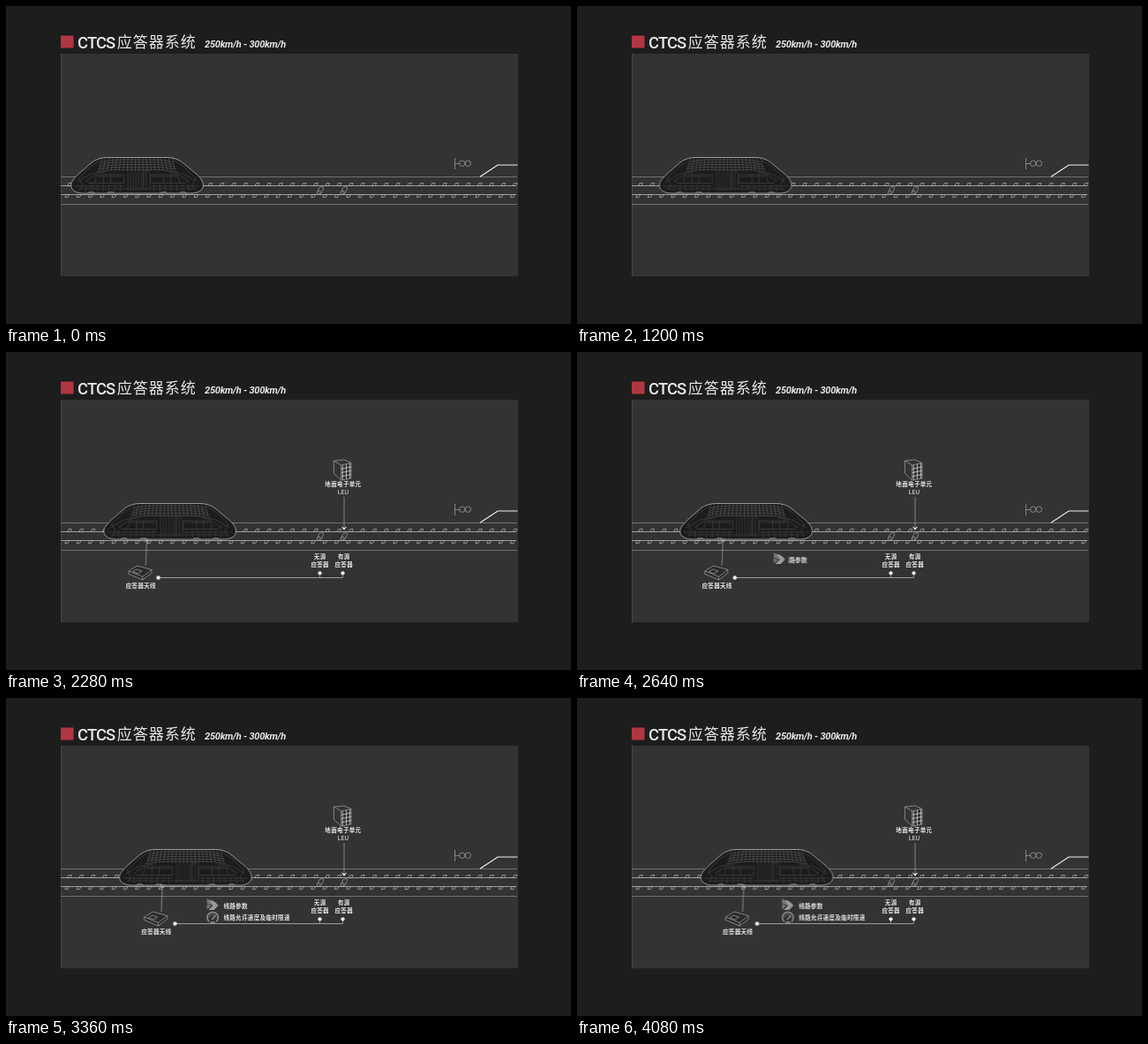
An HTML page that plays this animation: 640 by 360 pixels, repeating every 4200 ms.

```html
<!DOCTYPE html>
<html lang="zh-CN">
<head>
<meta charset="utf-8">
<title>CTCS应答器系统</title>
<style>
html, body { margin: 0; width: 100%; height: 100%; overflow: hidden; background: #1d1d1d; }
svg { display: block; width: 640px; height: 360px; }
text { font-family: "Noto Sans CJK SC", "Noto Sans CJK", sans-serif; fill: #e8e8e8; }
.label { font-size: 6.5px; font-weight: 700; letter-spacing: .35px; }
.mid { text-anchor: middle; }
.latin { font-family: Roboto, sans-serif; }
.thin { fill: none; stroke: #a8a8a8; stroke-width: .7; }
.solid { fill: #f4f4f4; }
.anim { animation: 4200ms linear -10ms infinite; }

.ride { animation-name: ride; animation-timing-function: steps(35); }
.plug { animation-name: plug; animation-timing-function: steps(35); }
.drift { animation-name: drift; animation-timing-function: steps(35); }
.shrink { animation-name: shrink; animation-timing-function: steps(35); transform-origin: 381.5px 255.5px; }
.leader { animation-name: leader; transform-origin: 122px 211px; }
.antenna { animation-name: antenna; }
.dot { animation-name: dot; transform-origin: 132.6px 255.5px; }
.wire { animation-name: wire; transform-origin: 132.6px 255.5px; }
.ground { animation-name: ground; }
.leu { animation-name: leu; }
.icon1 { animation-name: icon1; }
.icon2 { animation-name: icon2; }
.text1 { animation-name: text1; }
.text2 { animation-name: text2; }

@keyframes ride { to { transform: translateX(68.5px); } }
@keyframes plug { to { transform: translateX(73.5px); } }
@keyframes drift { to { transform: translateX(27.5px); } }
@keyframes shrink { to { transform: scaleX(.7047); } }
@keyframes leader { 0%, 31.4% { transform: scaleY(0); } 35%, 100% { transform: none; } }
@keyframes antenna { 0%, 34% { opacity: 0; } 38.5%, 100% { opacity: 1; } }
@keyframes dot { 0%, 38.5% { transform: scale(0); } 42.8%, 100% { transform: none; } }
@keyframes wire { 0%, 41% { transform: scaleX(0); } 49%, 100% { transform: none; } }
@keyframes ground { 0%, 47% { opacity: 0; } 51.4%, 100% { opacity: 1; } }
@keyframes leu { 0%, 49% { opacity: 0; } 53.5%, 100% { opacity: 1; } }
@keyframes icon1 { 0%, 59.5% { opacity: 0; } 62%, 100% { opacity: 1; } }
@keyframes icon2 { 0%, 67% { opacity: 0; } 70%, 100% { opacity: 1; } }
@keyframes text1 {
  0%, 60% { transform: translateX(-34px); animation-timing-function: cubic-bezier(.215, .61, .355, 1); }
  68.6%, 100% { transform: none; }
}
@keyframes text2 {
  0%, 68.6% { transform: translateX(-84px); animation-timing-function: cubic-bezier(.215, .61, .355, 1); }
  77%, 100% { transform: none; }
}
</style>
</head>
<body>
<svg viewBox="0 0 640 360">
  <defs>
    <path id="hull" d="M73.7 203C73.7 198 78 194.5 84 188.5L97 177.3Q104 171.7 114 171.5H183Q193 171.7 200 177.3L216 190.5C220 194.5 223.4 198 223.4 203C223.4 209 217 212 209 212H88C80 212 73.7 209 73.7 203Z"/>
    <clipPath id="inside"><use href="#hull"/></clipPath>
    <clipPath id="slot"><rect x="222.5" y="224" width="130" height="36"/></clipPath>
    <g id="balise" class="thin">
      <path d="M-3.8 3L-1.3 -2.6Q-.8 -3.7 .6 -3.8L3 -4Q4.3 -3.8 3.7 -2.4L1.4 2.8Q.8 4 -.4 4.1L-2.8 4.4Q-4.4 4.3 -3.8 3Z"/>
      <path d="M-3.4 1.8Q-.6 -.6 .2 1.4L-.4 4"/>
    </g>
    <g id="node">
      <path class="thin" d="M0 250V255.5"/>
      <circle class="solid" cy="250.3" r="2.1"/>
    </g>
  </defs>

  <rect x="62" y="54" width="518" height="252" fill="#333"/>
  <path d="M62.5 54V306" stroke="#484848"/>
  <rect x="62" y="33.5" width="14.5" height="14" fill="#b23642"/>
  <text class="latin" x="81" y="47.5" font-size="18.4" font-weight="500" letter-spacing="-.85">CTCS</text>
  <text x="125.7" y="47.2" font-size="17" font-weight="500" letter-spacing="1">应答器系统</text>
  <text class="latin" x="225" y="47.4" font-size="11" font-weight="700" font-style="italic" letter-spacing="-.24">250km/h - 300km/h</text>

  <g fill="none">
    <path d="M62 193.5H579M62 224.5H579" stroke="#707070"/>
    <path d="M62 203.5H578M62 213.5H578" stroke="#9c9c9c"/>
    <path id="ties" stroke="#b4b4b4" stroke-width=".7"/>
    <path d="M537 193.3L557 180H579.5" stroke="#f0f0f0" stroke-width="1.2"/>
  </g>
  <g class="thin">
    <path d="M508.5 172V185M508.5 178.5H513.3"/>
    <circle cx="516.7" cy="178.2" r="3.2"/><circle cx="523.3" cy="178.2" r="3.2"/>
  </g>
  <use href="#balise" x="356" y="208.7"/>
  <use href="#balise" x="382.9" y="208.7"/>

  <g class="anim ride">
    <use href="#hull" fill="#1c1c1c"/>
    <g clip-path="url(#inside)" fill="none">
      <path id="roof" stroke="#666" stroke-width=".5"/>
      <path id="sides" stroke="#505050" stroke-width=".55"/>
      <path id="bars" stroke="#444" stroke-width=".6"/>
    </g>
    <use href="#hull" fill="none" stroke="#b4b4b4" stroke-width=".8"/>
    <path id="bogies" fill="none" stroke="#b4b4b4" stroke-width=".7"/>
    <g class="anim leader">
      <path class="thin" d="M120.5 211V214.5H124V211M122.4 212L121 242"/>
    </g>
    <g class="anim antenna">
      <g class="thin">
        <path fill="#2a2a2a" d="M101.8 248L111.5 242L127.8 246.5V250.3L117.6 258L101.8 251.3Z"/>
        <path d="M101.8 248L117.6 254.3L127.8 246.5M117.6 254.3V258M106.5 248.6L110.7 246L116.7 248L112.4 250.9Z"/>
      </g>
      <text class="label mid" x="115.6" y="267">应答器天线</text>
    </g>
  </g>

  <g class="anim shrink"><rect class="anim wire" x="132.6" y="255" width="248.9" height=".9" fill="#a8a8a8"/></g>
  <g class="anim plug"><circle class="anim dot solid" cx="132.6" cy="255.5" r="2.2"/></g>

  <g class="anim ground">
    <use href="#node" x="355.5"/>
    <use href="#node" x="381.5"/>
    <text class="label mid" x="355.7" y="233.6">无源</text>
    <text class="label mid" x="355.7" y="243.2">应答器</text>
    <text class="label mid" x="382.8" y="233.6">有源</text>
    <text class="label mid" x="382.8" y="243.2">应答器</text>
  </g>

  <g class="anim leu">
    <g class="thin">
      <path d="M371.3 123.2L383 122L391 125.6V143L379.8 145.2L371.5 137.5ZM371.3 123.2L379.6 128L391 125.6M379.6 128L379.8 145.2"/>
      <path id="cells" stroke="#ddd"/>
      <path d="M383 164V198"/>
    </g>
    <text class="label mid" x="381.9" y="151.6">地面电子单元</text>
    <text class="latin mid" x="381.8" y="161" font-size="7">LEU</text>
    <path class="solid" d="M379.8 197.5L383 199L386.2 197.5L383 201.8Z"/>
  </g>

  <g class="anim drift">
    <g class="anim icon1" fill="#9a9a9a">
      <path d="M205.6 227L211.5 230.5V234L205.6 239.5Z" fill="#777"/>
      <path d="M209 228.5Q215 229.5 218.3 235L213.5 240H207L212 235Z"/>
      <path d="M205.6 233L211.5 235L207 239.8" fill="none" stroke="#333" stroke-width=".8"/>
    </g>
    <g class="anim icon2" fill="none" stroke="#9a9a9a">
      <path d="M208 253.2A6.2 6.2 0 1 1 216.2 253.2" stroke-width="1.4"/>
      <path d="M208.2 248.6A3.9 3.9 0 0 1 216 248.6" stroke-width="1.3" stroke-dasharray="1 1.2"/>
      <path d="M211.5 251L214.8 246.3M209.5 254H214.7" stroke-width="1.3"/>
    </g>
    <g clip-path="url(#slot)">
      <text class="label anim text1" x="224.4" y="238">线路参数</text>
      <text class="label anim text2" x="224.4" y="250.6">线路允许速度及临时限速</text>
    </g>
  </g>
</svg>
<script>
const range = (n, f) => Array.from({ length: n }, (_, i) => f(i)).join('');
const draw = (id, d) => document.getElementById(id).setAttribute('d', d);
const AXIS = 148.6;
// Build a shape for both ends of the train, mirrored about its middle.
const both = f => [-1, 1].map(s => f(v => AXIS + s * v)).join('');

const tie = (x, y, h) => `M${x - 2.2} ${y + h}l1.4 ${-h}h3.4l-1.4 ${h}z`;
draw('ties', range(39, i => {
  const x = i * 13.28;
  return tie(71.8 + x, 200.5, 3) + tie(69 + x, 213.5, 3);
}));

draw('roof',
  range(5, i => {
    const y = 174 + i * 2.8, w = 40 + i * 1.5;
    return `M${AXIS - w} ${y + 2.5}Q${AXIS - 30} ${y} ${AXIS - 20} ${y}H${AXIS + 20}Q${AXIS + 30} ${y} ${AXIS + w} ${y + 2.5}`;
  }) +
  both(m => range(10, i => {
    const x = 2 + i * 4.2;
    return `M${m(x)} 172L${m(x * 1.08)} ${187 - i * .2}`;
  })));

draw('sides', both(m =>
  `M${m(15)} 191H${m(47)}L${m(58)} 198L${m(54)} 200.5H${m(15)}Z` +
  `M${m(17)} 193H${m(45)}M${m(30)} 191V200M${m(38)} 191V200M${m(46)} 191L${m(48)} 200` +
  `M${m(42)} 175L${m(53)} 182L${m(67)} 196M${m(36)} 188L${m(52)} 190L${m(68)} 199` +
  `M${m(66)} 195L${m(62)} 203L${m(66)} 209M${m(15)} 204H${m(71)}`));

draw('bars',
  both(m => range(4, i => `M${m(1.5 + i * 3)} 187V209`) +
    range(7, i => `M${m(19 + i * 6.5)} 202V210`) + `M${m(0)} 207H${m(66)}`) +
  'M155 207V190Q155 186 159 186Q163 186 163 190V207');

draw('bogies', both(m =>
  [30, 52].map(x => `M${m(x - 4)} 212L${m(x - 2.5)} 210.8H${m(x + 2.5)}L${m(x + 4)} 212`).join('')));

draw('cells',
  range(3, i => `M379.8 ${132.3 + i * 4.3}L391 ${130 + i * 4.3}`) +
  'M385.5 127V144M381.3 128V144.5M389.5 126V143');
</script>
</body>
</html>
```
